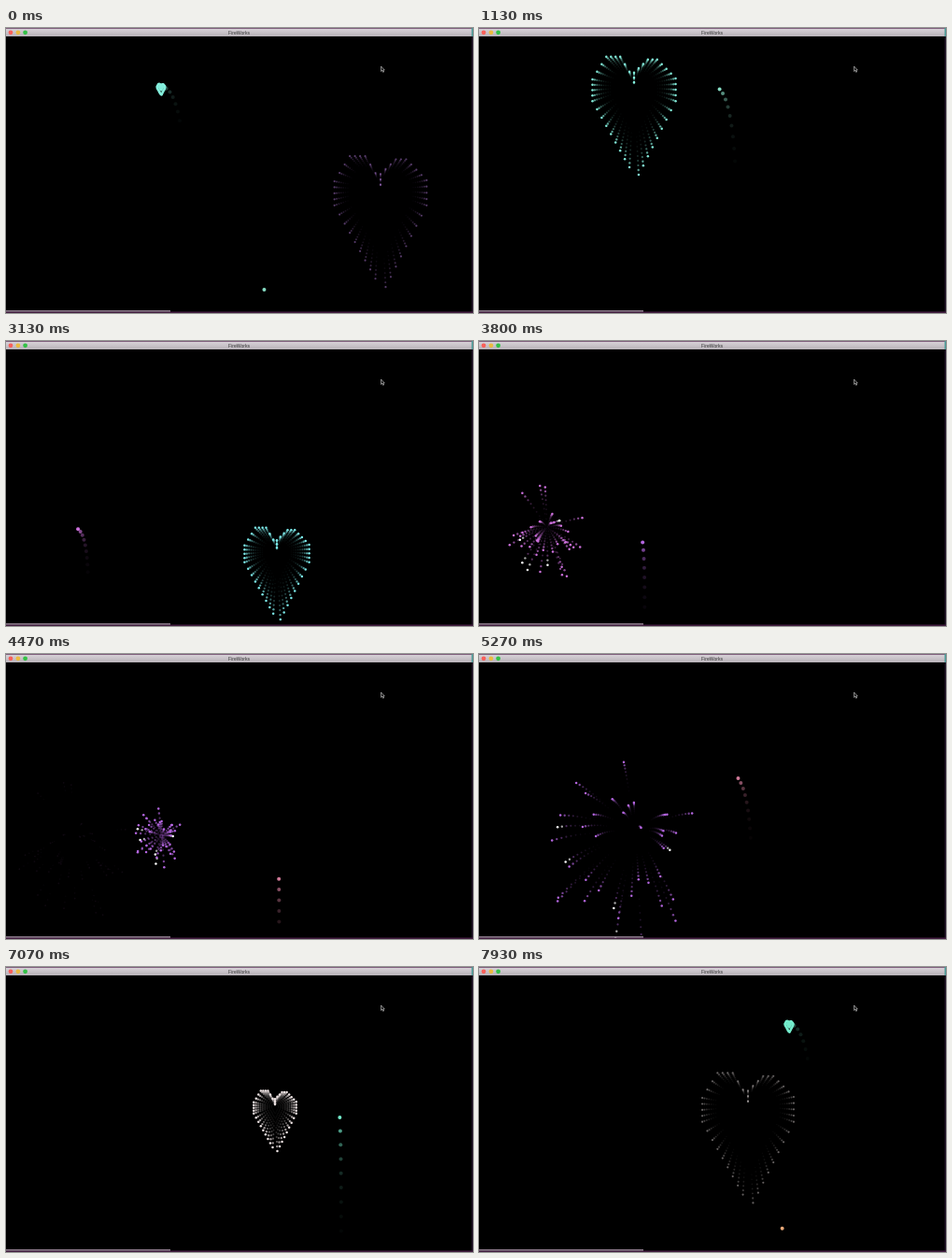
Write an HTML page with a canvas that moves like this. It is 500 px wide and 305 px high and loops after 8 s.

```html
<!DOCTYPE html>
<html lang="en">
<head>
<meta charset="utf-8">
<title>FireWorks</title>
<style>
  html, body { margin: 0; width: 100%; height: 100%; overflow: hidden; background: #000; }
  svg, canvas { position: absolute; left: 0; top: 0; width: 500px; height: 305px; }
</style>
</head>
<body>
<canvas id="sky"></canvas>
<svg viewBox="0 0 500 305">
  <defs>
    <linearGradient id="bar" x2="0" y2="1">
      <stop stop-color="#d8d2d8"/><stop offset="1" stop-color="#b8b2b8"/>
    </linearGradient>
  </defs>
  <rect x="498.6" width="1.4" height="305" fill="#24152a"/>
  <rect y="303.5" width="500" height="1.5" fill="#431d40"/>
  <rect y="302.2" width="176" height="1.4" fill="#a08a9e"/>
  <rect width="500" height="1" fill="#6b4568"/>
  <rect y=".8" width="499" height="8.2" fill="url(#bar)"/>
  <rect x="498.5" width="1.5" height="9" fill="#4a9a96"/>
  <circle cx="5" cy="4.8" r="2.4" fill="#f9605a"/>
  <circle cx="12.9" cy="4.8" r="2.4" fill="#ecbb40"/>
  <circle cx="20.6" cy="4.8" r="2.4" fill="#32c146"/>
  <text x="249.6" y="6.6" font-family="'Liberation Sans', Arial, sans-serif" font-size="5.1"
        text-anchor="middle" fill="#333">FireWorks</text>
  <path d="M401.6 41v5.4l1.2-1.1 .9 2 .9-.4-.9-1.9h1.6z" fill="#111" stroke="#ddd" stroke-width=".6"/>
</svg>
<script>
const LOOP = 8000, STEP = 1000 / 15, FADE = 0.65, TRAIL = 8;
const GROUND = 295, LAUNCH_DELAY = 50, WIND = 15, GRAVITY = 16;

const canvas = document.getElementById('sky');
const ctx = canvas.getContext('2d');
const ratio = window.devicePixelRatio || 1;
canvas.width = 500 * ratio;
canvas.height = 305 * ratio;
ctx.scale(ratio, ratio);

// Evenly spaced dots along a polyline: one per column, or about every 6 units on upright edges.
function outline(...corners) {
  return corners.slice(1).flatMap(([x, y], n) => {
    const [px, py] = corners[n];
    const count = Math.abs(x - px) || Math.round(Math.abs(y - py) / 6);
    return Array.from({ length: count }, (_, i) => {
      const part = (i + 1) / count;
      return [px + (x - px) * part, py + (y - py) * part];
    });
  });
}

const HEART = [
  ...outline([0, 0], [0, -15], [-1, -16], [-3, -32], [-6, -32], [-9, -8], [-9, 15], [-1, 85]),
  ...outline([0, -15], [3, -29], [5, -29], [9, -9], [9, 15], [1, 93]),
];

function heart(age) {
  const scale = age / 1232;
  return HEART.map(([column, y]) => ({ dx: column * 4.89 * scale, dy: y * scale }));
}

function seededRandom(seed) {
  return () => {
    seed = (seed * 16807) % 2147483647;
    return seed / 2147483647;
  };
}

function sparks(seed) {
  const random = seededRandom(seed * 7919);
  const pieces = Array.from({ length: 40 }, (_, i) => ({
    angle: random() * 2 * Math.PI,
    speed: 88 * (0.2 + 0.8 * random()),
    white: i % 8 === 0,
  }));
  return age => {
    const s = age / 1000;
    return pieces.map(({ angle, speed, white }) => ({
      dx: speed * s * Math.cos(angle),
      dy: speed * s * Math.sin(angle) + GRAVITY * s * s,
      white,
    }));
  };
}

// Each rocket starts just after the one before has burst, and is blown left as it climbs.
const rockets = [];
function addRocket(burst, x, y, color, shape = heart) {
  const previous = rockets.at(-1);
  const launch = previous ? previous.burst + LAUNCH_DELAY : burst - 1000;
  const startX = x + WIND * ((burst - launch) / 1000) ** 2;
  if (previous) previous.end = burst;
  rockets.push({ launch, burst, end: Infinity, startX, x, y, color, shape });
}
addRocket(-1514, 401, 173, '#cc8cf8');
addRocket(-113, 166, 63, '#84eedc');
addRocket(1240, 251, 62.5, '#86dcc4');
addRocket(2165, 290, 225, '#7ceaea');
addRocket(3220, 73, 200, '#cc70dc', sparks(4));
addRocket(4100, 167, 195, '#b466e0', sparks(9));
addRocket(5450, 267, 127, '#d07a98', sparks(23));
addRocket(6430, 288, 149, '#eee4e4');
addRocket(7818, 332, 61, '#74eccc');
addRocket(9150, 300, 70, '#e8a878');

function flight(r, time) {
  const u = (time - r.launch) / (r.burst - r.launch);
  return [r.startX + (r.x - r.startX) * u ** 3.5, GROUND + (r.y - GROUND) * (4 * u - u ** 4) / 3];
}

function dot(x, y, radius, color) {
  ctx.fillStyle = color;
  ctx.beginPath();
  ctx.arc(x, y, radius, 0, 2 * Math.PI);
  ctx.fill();
}

function drawRocket(r, time, back) {
  if (time > r.launch && time < r.burst) {
    dot(...flight(r, time), 2, r.color);
  } else if (time >= r.burst && time < r.end) {
    for (const { dx, dy, white } of r.shape(time - r.burst)) {
      dot(r.x + dx, r.y + dy, 1.25 * 0.94 ** back, white && back < 2 ? '#fff' : r.color);
    }
  }
}

// Past positions stay visible as a fading afterglow, oldest painted first.
function draw(time) {
  ctx.globalAlpha = 1;
  ctx.fillStyle = '#000';
  ctx.fillRect(0, 0, 500, 305);
  for (let back = TRAIL; back >= 0; back--) {
    ctx.globalAlpha = FADE ** back;
    for (const r of rockets) drawRocket(r, time - back * STEP, back);
  }
}

const start = performance.now();
function tick() {
  const time = (performance.now() - start) % LOOP;
  draw(Math.floor((time + 5) / STEP) * STEP);
  requestAnimationFrame(tick);
}
tick();
</script>
</body>
</html>
```
